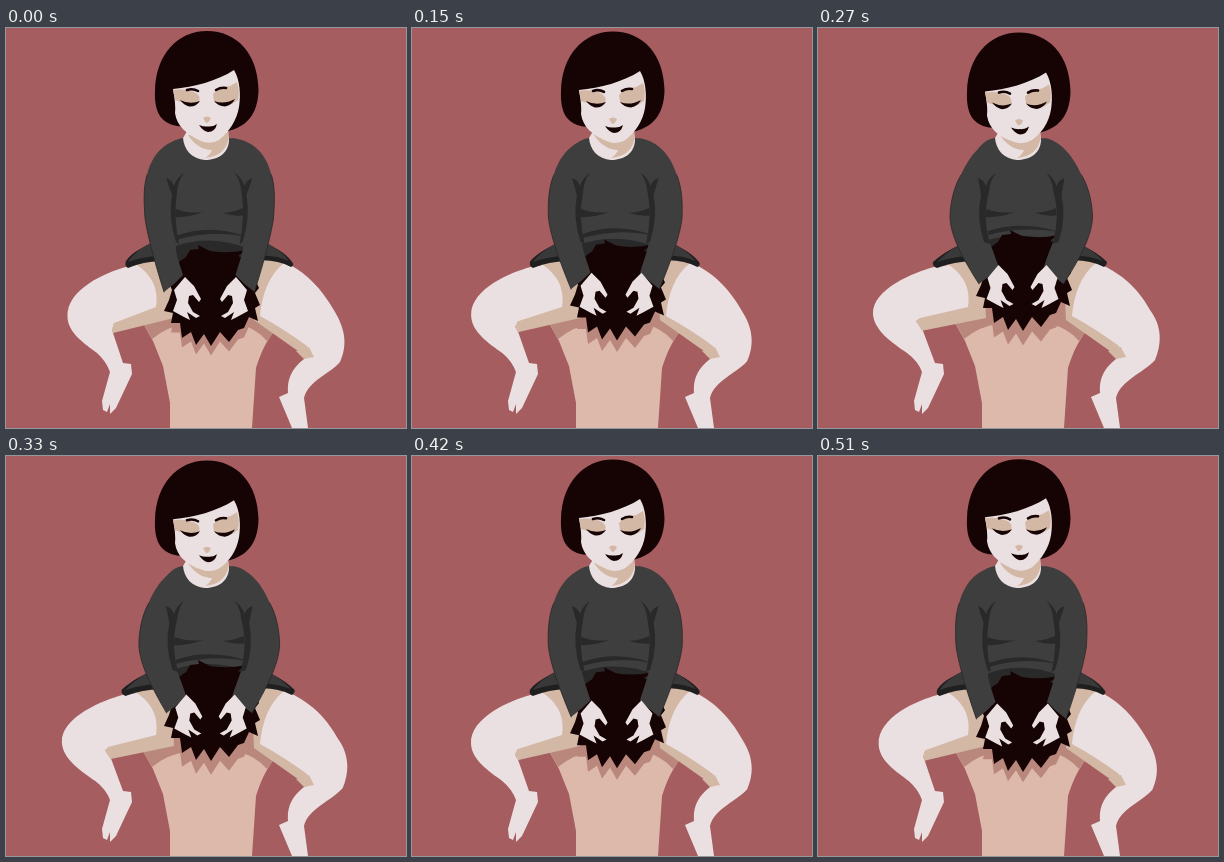
Animation of 400 by 400 pixels, one loop 0.54 s. Source, as an HTML page:

```html
<!DOCTYPE html>
<html lang="en">
<head>
<meta charset="utf-8">
<title>Loop</title>
<style>
html, body { margin: 0; width: 100%; height: 100%; overflow: hidden; background: #a65d5f; }
svg { display: block; width: 100vw; height: 100vh; }
</style>
</head>
<body>
<svg id="stage" viewBox="0 0 400 400"></svg>
<script>
const NS = 'http://www.w3.org/2000/svg';
const stage = document.getElementById('stage');
const C = {
  bg: '#a65d5f', light: '#ebe0e1', tan: '#d3b8a6', back: '#ddb9ab',
  shade: '#ba877d', hair: '#160405', knit: '#3e3e3e', fold: '#292929', hem: '#1f1f1f'
};
const LOOP = 540;
// [start time, amount of bend]
const KEYS = [[0, 0], [120, .15], [150, .36], [210, .65], [240, .87], [270, 1],
  [330, .87], [360, .65], [420, .38], [480, .25], [510, .13]];
const MIRROR = 'translate(406.5 0) scale(-1 1)';
const moving = [];

// "a~b" in a template means a + b * bend
const fill = (tpl, k) => tpl.replace(/(-?[\d.]+)~(-?[\d.]+)/g,
  (m, a, b) => (+a + b * k).toFixed(2));

function node(tag, attrs, parent = stage) {
  const el = document.createElementNS(NS, tag);
  for (const name in attrs) {
    const val = String(attrs[name]);
    if (val.includes('~')) moving.push([el, name, val]);
    el.setAttribute(name, fill(val, 0));
  }
  parent.appendChild(el);
  return el;
}
const shape = (d, color, parent) => node('path', { d, fill: color }, parent);
const line = (d, color, w, parent) => node('path', {
  d, fill: 'none', stroke: color, 'stroke-width': w, 'stroke-linecap': 'round'
}, parent);
const group = transform => node('g', { transform });

const crown = 'M166 262 L162 253 L169 245 L170 236 L180 229 L184 222 L193 221 L192 217 L204 223 Q222 226 240 222 L232 228 Q244 232 249 240 L247 247 L253 260 L249 265 L254 277 L249 280 L252 293 L243 289 L238 300 L232 302 L223 314 L214 304 L205 318 L198 306 L190 317 L185 304 L176 310 L174 295 L165 295 L167 285 L158 283 L163 272 Z';

node('rect', { width: 400, height: 400, fill: C.bg });

// lower figure's back
shape('M133 288 L147 313 L157 338 L164 375 V400 H246 L248 370 L250 340 C255 324 261 312 269 302 L250 278 H150 Z', C.back);
shape('M133 288 L146 311 Q162 298 180 296 H232 Q250 300 261 313 L269 302 L250 278 H150 Z', C.shade);
shape(crown, C.shade, group('translate(0 9.5~-10)'));

// inner thighs
shape('M128 236 L165 228 L168 290 L107~-4 305~-2 L104~-7 296~-6 L148 270 Z', C.tan);
shape('M280 234 L245 230 L248 292 L299 328 L306 331 L304 318 L256 280 Z', C.tan);

// left leg
shape('M120~-4 239 C101~-4 244 60~-6 261 61.5~-6.5 289~-3 C62~-6 305~-2 79~-4 316~-1 91~-2 325 Q100 333 104 344 L96 373 L97 382 L101 384 L104 376 L104 386 L110 380 L126 346 L125 336 L117 335 L107~-2 305~-2 L106~-8 302~-9 L108~-6 295~-5 L150 279 C152 266 150 250 131 237 Z', C.light);
shape('M106~-8 302~-9 L108~-6 295~-5 L115~-5 299~-3 L107~-3 305~-2 Z', C.tan);
// right leg
shape('M286 238 C300~2 246 315~4 259~-1 329~3 284~-2 C337~4 298~-4 343~3 314~-4 334~3 334~-2 C325 345 302 353 298 370 L302 400 H286 L273 369 L282 365 C281 352 285 341 298 331 L304 327 L301 318 Q278 301 254 288 C256 266 263 247 278 235 Z', C.light);
shape('M303 319 L308 329 L298 331 L290 323 Z', C.tan);

// skirt
shape('M148 214 C139 218 126 224 120~-5 233~1 Q118~-4 238 122~-3 240 Q143 231 165 234 L240 234 Q266 229 285~1 239 Q289 237 286~3 234 C280 225 268 219 258 214 Z', C.hem);
shape('M147 214 C136 219 127 226 122~-3 234 Q142 226 166 229 H240 Q266 225 283~2 233 C276 224 267 218 258 214 Z', '#393939');

// torso
shape('M177 110 C163 112 155 125 152 145 L162 235 H244 L254 145 C250 123 241 112 223 110 Z', C.knit);
shape('M168~-2 180 Q180 186 197 184 Q182 190 168~-2 189 Z', C.fold);
shape('M240~2 178 Q231 184 217 185 Q230 189 240~2 187 Z', C.fold);
shape('M170 208~-5 Q204 195~-3 241 209~-5 Q205 201~-3 170 212~-5 Z', C.fold);
shape('M170 218~-6 Q204 206~-4 241 220~-6 V234 H170 Z', C.fold);

// lower figure's hair
shape(crown, C.hair, group('translate(0 0~-15)'));

// sleeves and hands
const outer = '141~2 147 C137~-2 160 138~-6 176~2 139~-7 190 C141~-8 205~4 148~-3 232~-1 158~3 264~-8';
for (const side of ['translate(0 0)', MIRROR]) {
  const arm = group(side);
  shape(`M180 110 C163~3 112 147~5 122~4 ${outer} Q168~2 257~-8 177~4 247~-7 C172~4 231~-7 167~3 218~-6 168~-2 198 L172 160 L184 130 Z`, C.knit, arm);
  shape('M178 145 Q172 152 171 164 Q167~-3 188 173~-1 216 L170~-4 214 Q162~-4 190 166~-3 167 L160 150 Q166 152 168 158 Q171 149 178 145 Z', C.fold, arm);
  line('M' + outer, C.fold, .8, arm);
}
for (const tf of ['translate(0~1.5 0~-12)', 'translate(409~-1.5 0~-12) scale(-1 1)']) {
  shape('M168 262 L179 249 L188 258 L195 271 L193 274 L187 267 L183 268 L182 275 L187 284 L194 288 L190 290 L181 284 L184 292 L178 289 L167 283 L171 272 Z', C.light, group(tf));
}

// neck
shape('M183 100 H222 L223 113 C222 126 211 132 199 132 C186 131 178 122 177 110 Z', C.light);
shape('M182 107 Q192 122 206 122 Q204 127 199 130 Q218 128 222 113 V103 Z', C.tan);

// head
const bob = group('translate(0 0~1.6)');
shape('M201 3 C171 3 150 27 149 62 C148 83 154 95 171 98 L222 103 C239 99 252 88 252.5 62 C252 26 231 3 201 3 Z', C.hair, bob);
const face = group('translate(0 0~2.6)');
shape('M167 61 C188 59 211 53 228 42 C234 52 235 67 233 79 C231 92 223 104 213 112~-2 Q204 117~-2.5 195 113~-2 C180 106 171 98 169 85 Q170 77 167 61 Z', C.light, face);
shape('M167 62 Q180 60 190 65 Q195 68 193 74 Q184 78 169 72 Z', C.tan, face);
shape('M207 66 Q213 59 224 58 L231 54 Q234 62 232 72 L226 76 Q213 79 208 73 Z', C.tan, face);
line('M181 62 Q187 60 192 63', C.hair, 2.6, face);
line('M210 62 Q215 59 220 60', C.hair, 2.6, face);
shape('M174 72 Q184 77 194 73 Q190 79 183 78.5 Q178 77 174 72 Z', C.hair, face);
shape('M208 73 Q218 77 229 71 Q226 77 219 78.5 Q212 78 208 73 Z', C.hair, face);
shape('M197 90 Q201 87 205 90 Q203 95 200 95 Z', C.tan, face);
shape('M193 97 Q198 99 202 98.5 Q207 99 211 96 Q209 104 202 104 Q197 103 193 97 Z', C.hair, face);

function draw(ms) {
  const t = ms % LOOP;
  let bend = 0;
  for (const [at, v] of KEYS) if (t >= at) bend = v;
  for (const [el, name, tpl] of moving) el.setAttribute(name, fill(tpl, bend));
}
const start = performance.now();
function tick() {
  draw(Math.max(0, performance.now() - start));
  requestAnimationFrame(tick);
}
draw(0);
requestAnimationFrame(tick);
</script>
</body>
</html>
```
